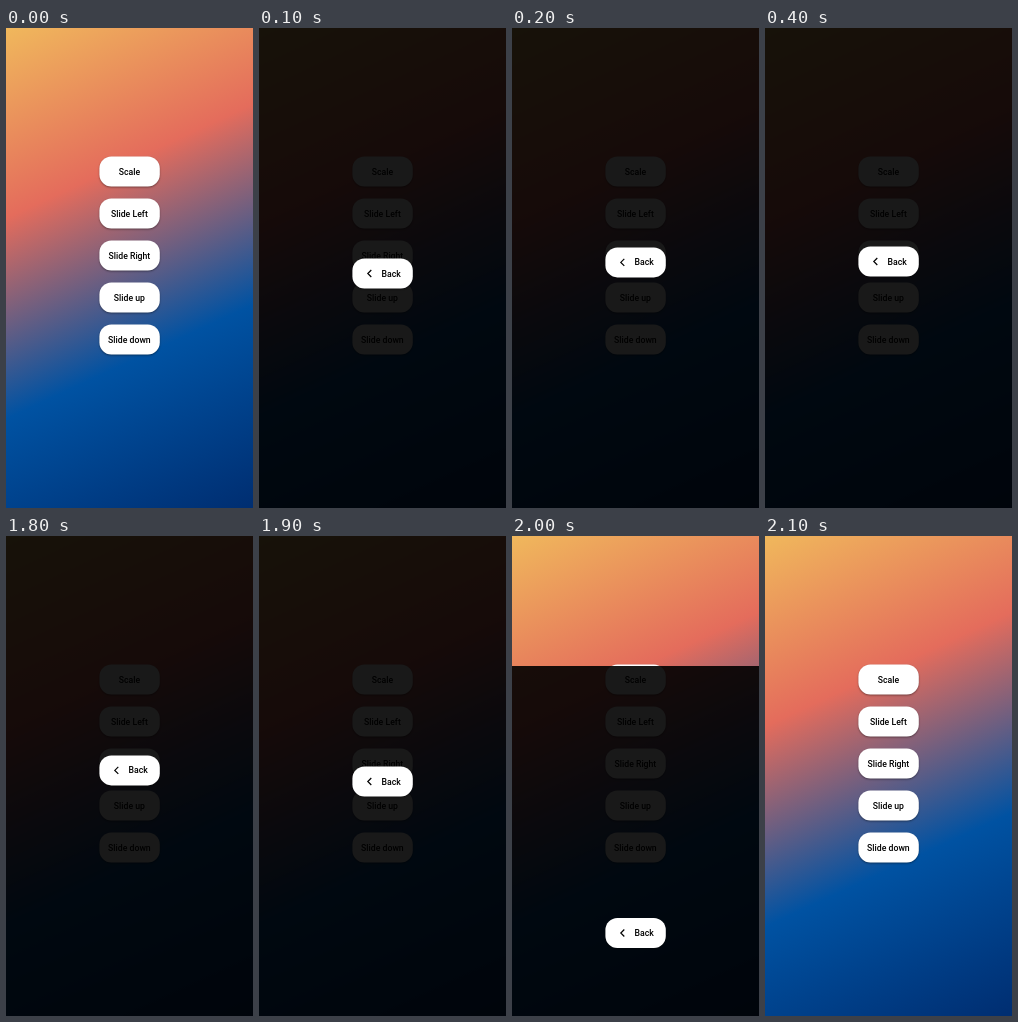
Animation, 247 px wide and 480 px high, one loop 3.6 s. Source, as an HTML page with a canvas:

```html
<!DOCTYPE html>
<html lang="en">
<head>
<meta charset="utf-8">
<title>Slide up transition</title>
<style>
html, body { margin: 0; width: 100%; height: 100%; overflow: hidden; background: #000; }
canvas { display: block; width: 100vw; height: 100vh; }
</style>
</head>
<body>
<canvas id="stage"></canvas>
<script>
const W = 247, H = 480, LOOP = 3600, TICK = 100;
const PAGE_TOP = -33.5, PAGE_H = 534;
const BTN = { x: 93.4, w: 60.4, h: 30, r: 12 };
const LABELS = ['Scale', 'Slide Left', 'Slide Right', 'Slide up', 'Slide down'];

const canvas = document.getElementById('stage');
const dpr = window.devicePixelRatio || 1;
canvas.width = W * dpr;
canvas.height = H * dpr;
const ctx = canvas.getContext('2d');
ctx.scale(dpr, dpr);

const sky = ctx.createLinearGradient(0, PAGE_TOP, W, PAGE_TOP + PAGE_H);
[[0, '#f2c55c'], [0.345, '#e46c5c'], [0.655, '#0052a2'], [1, '#002a6c']]
  .forEach(([at, color]) => sky.addColorStop(at, color));

function label(text, x, y, align) {
  ctx.font = '500 8.7px Roboto, sans-serif';
  ctx.textAlign = align;
  ctx.textBaseline = 'alphabetic';
  ctx.fillStyle = '#000';
  ctx.fillText(text, x, y + 3.1);
}

function button(cy) {
  ctx.save();
  ctx.shadowColor = 'rgba(0,0,0,0.4)';
  ctx.shadowBlur = 2 * dpr;
  ctx.shadowOffsetY = dpr;
  ctx.fillStyle = '#fff';
  ctx.beginPath();
  ctx.roundRect(BTN.x, cy - BTN.h / 2, BTN.w, BTN.h, BTN.r);
  ctx.fill();
  ctx.restore();
}

function menu() {
  ctx.fillStyle = sky;
  ctx.fillRect(0, 0, W, H);
  LABELS.forEach((text, i) => {
    const cy = 143.5 + 42 * i;
    button(cy);
    label(text, 123.4, cy, 'center');
  });
}

function overlay(dy) {
  ctx.fillStyle = 'rgba(0,0,0,0.9)';
  ctx.fillRect(0, PAGE_TOP + dy, W, PAGE_H);
  const cy = 233.5 + dy;
  button(cy);
  ctx.strokeStyle = '#000';
  ctx.lineWidth = 1.2;
  ctx.beginPath();
  ctx.moveTo(112.3, cy - 3.5);
  ctx.lineTo(108.8, cy);
  ctx.lineTo(112.3, cy + 3.5);
  ctx.stroke();
  label('Back', 122.6, cy, 'left');
}

// Distance of the overlay below its resting place, or null while closed
function offset(ms) {
  if (ms < 100 || ms >= 2100) return null;
  if (ms < 400) return 12 * Math.pow(13.6, (100 - ms) / 100);
  if (ms < 1700) return 0;
  return 163.5 * Math.pow(13.6, (ms - 2000) / 100);
}

function draw(now) {
  const ms = Math.floor((now % LOOP) / TICK) * TICK;
  const dy = offset(ms);
  menu();
  if (dy !== null) overlay(dy);
  requestAnimationFrame(draw);
}
requestAnimationFrame(draw);
</script>
</body>
</html>
```
